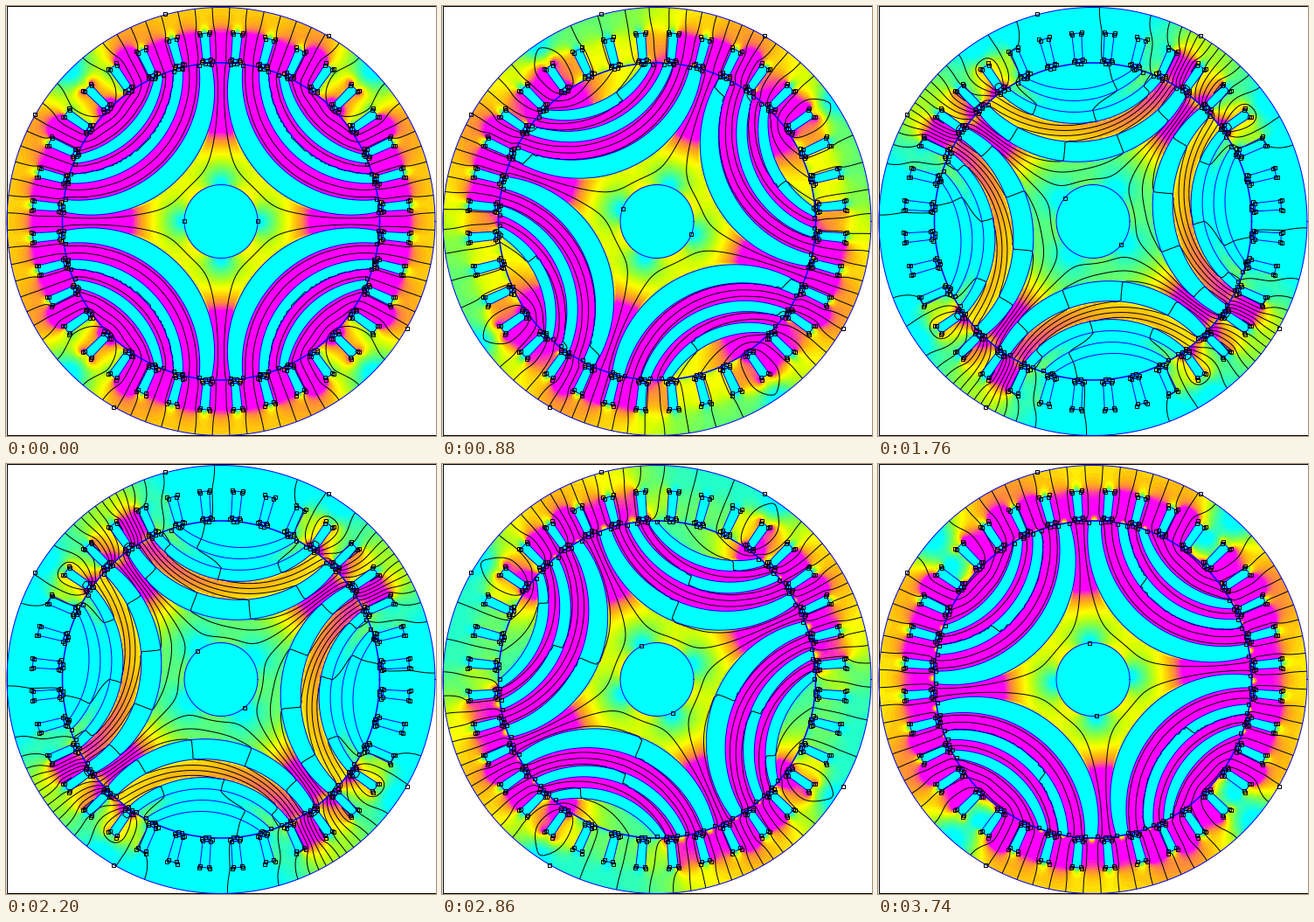
Recreate the animation shown at these times as a matplotlib script. Size 492 by 492 pixels, loop 3.96 s.

```python
import numpy as np
import matplotlib.pyplot as plt
from matplotlib.animation import FuncAnimation
from matplotlib.colors import LinearSegmentedColormap

SIZE, DPI = 492, 123
FRAMES, INTERVAL, STEP = 18, 220, 5
CX, CY = 245.5, 246
R_SHAFT, R_ROTOR, R_BORE, R_OUT = 42, 181, 182, 245
MMF = 2.1
PX = 72 / DPI
BLUE = "#0000ff"

# flux barrier edges: radius on the barrier axis, half angle at the rotor rim
EDGES = [(69, 41.5), (92, 37), (113, 31), (126, 27.5), (139, 23.5), (152, 20)]

DENSITY = LinearSegmentedColormap.from_list("density", [
    (0, "#00ffff"), (0.13, "#00ffff"), (0.28, "#46ff96"), (0.41, "#91ff37"),
    (0.51, "#d7ff00"), (0.58, "#ffff00"), (0.72, "#ffb90f"),
    (0.84, "#ff8246"), (1, "#ff00ff")], N=40)


def arc_circle(rq, half):
    """Centre distance and radius of the circle that forms a barrier edge."""
    c = (R_ROTOR**2 - rq**2) / (2 * (R_ROTOR * np.cos(np.radians(half)) - rq))
    return c, c - rq


ARCS = [arc_circle(*e) for e in EDGES]


def polar(r, deg):
    return r * np.exp(1j * np.radians(deg))


def in_barrier(r, deg):
    z = polar(r, deg % 90 - 45)
    past = [abs(z - c) < rho for c, rho in ARCS]
    return ((past[0] & ~past[1]) | (past[2] & ~past[3]) | (past[4] & ~past[5]))


def in_slot(r, deg):
    z = polar(r, deg % 10 - 5)
    u, v = z.real, abs(z.imag)
    body = (u > 186) & (u < 216) & (v < 4.6 + 0.03 * (u - 186))
    mouth = (u <= 186) & (v < 2)
    return body | mouth


def is_iron(r, deg, turn):
    rotor = (r > R_SHAFT) & (r < R_ROTOR) & ~in_barrier(r, deg + turn)
    stator = (r > R_BORE) & ~in_slot(r, deg)
    return rotor | stator


# ---- magnetic field on a polar grid covering one pole (90 degrees) ----
N = 108
DEG = 90 / N
DTH = np.radians(DEG)
ROTOR_ROWS = 52
r = np.concatenate([np.linspace(R_SHAFT, R_ROTOR, ROTOR_ROWS + 1),
                    [R_BORE, 184], np.linspace(186, 216, 11),
                    np.linspace(216, R_OUT, 9)[1:]])
M = len(r) - 1
dr = np.diff(r)
rc = (r[1:] + r[:-1]) / 2
idx = np.arange(N)
nxt = (idx + 1) % N


def iron_share(turn, sub=4):
    s = (np.arange(sub) + 0.5) / sub
    rs = (r[:-1, None] + dr[:, None] * s).ravel()
    ds = ((idx[:, None] + s) * DEG).ravel()
    iron = is_iron(rs[:, None], ds[None, :], turn)
    return iron.reshape(M, sub, N, sub).mean(axis=(1, 3))


def coil_source(share):
    """Current of the three wound slots around 45 degrees."""
    w = (1 - share) * (rc * dr)[:, None]
    w[(rc < 186) | (rc > 216)] = 0
    w[:, :36] = w[:, 72:] = 0
    w *= 2 * MMF / w.sum()
    src = np.zeros((M + 1, N))
    for di in (0, 1):
        for dj in (0, 1):
            src[di:di + M] += np.roll(w, dj, axis=1) / 4
    return src


def solve(nu, src):
    """Vector potential, block elimination row by row, sign flip at 90 deg."""
    rad = (nu + np.roll(nu, 1, axis=1)) / 2 * (rc * DTH / dr)[:, None]
    half = nu * dr[:, None] / 2
    tan = np.zeros((M + 1, N))
    tan[:-1] += half
    tan[1:] += half
    tan /= r[:, None] * DTH
    diag = tan + np.roll(tan, 1, axis=1)
    diag[:-1] += rad
    diag[1:] += rad
    invs, rhs = [None], [None]
    for i in range(1, M + 1):
        s = np.zeros((N, N))
        off = -tan[i]
        off[-1] *= -1
        s[idx, idx] = diag[i]
        s[idx, nxt] = off
        s[nxt, idx] = off
        y = src[i]
        if i > 1:
            g = rad[i - 1]
            s -= g[:, None] * invs[-1] * g
            y = y + g * (invs[-1] @ rhs[-1])
        invs.append(np.linalg.inv(s))
        rhs.append(y)
    a = np.zeros((M + 1, N))
    a[M] = invs[M] @ rhs[M]
    for i in range(M - 1, 0, -1):
        a[i] = invs[i] @ (rhs[i] + rad[i] * a[i + 1])
    return np.hstack([a, -a[:, :1]])


def flux_density(a):
    br = np.diff(a, axis=1) / (r[:, None] * DTH)
    bt = np.diff(a, axis=0) / dr[:, None]
    return np.hypot((br[1:] + br[:-1]) / 2, (bt[:, 1:] + bt[:, :-1]) / 2)


def blur(a):
    a = np.roll(a, 1, axis=1) + a + np.roll(a, -1, axis=1)
    p = np.pad(a, ((1, 1), (0, 0)), mode="edge")
    return p[:-2] + p[1:-1] + p[2:]


def spread(b, share):
    """Carry the iron values one cell into the air next to them."""
    w = (share > 0.45).astype(float)
    return np.where(w > 0, b, blur(b * w) / np.maximum(blur(w), 1e-9))


def compute_fields():
    fields = [None] * FRAMES
    src = coil_source(iron_share(0))
    nu_iron = np.full((M, N), 0.001)
    for k in range(FRAMES // 2, -1, -1):
        share = iron_share(STEP * k)
        for _ in range(14 if k == FRAMES // 2 else 9):
            a = solve(1 / (share / nu_iron + 1 - share), src)
            b = flux_density(a) / np.maximum(share, 0.4)
            goal = np.minimum(0.0004 + 0.006 * (b / 1.62)**8, 1)
            nu_iron = nu_iron**0.85 * goal**0.15
        shown = spread(b, share)
        fields[k] = a, shown
        if k:
            fields[FRAMES - k] = a[:, ::-1], shown[:, ::-1]
        shift = round(STEP / DEG)
        nu_iron[:ROTOR_ROWS] = np.roll(nu_iron[:ROTOR_ROWS], shift, axis=1)
    return fields


FIELDS = compute_fields()

# ---- picture ----
px, py = np.meshgrid(np.arange(SIZE), np.arange(SIZE))
pix = (px - CX) + 1j * (CY - py)
pix_r, pix_deg = abs(pix), np.degrees(np.angle(pix))
row = np.interp(pix_r, rc, np.arange(M))
i0 = np.minimum(row.astype(int), M - 2)
fi = row - i0
col = (pix_deg % 90) / DEG - 0.5
j0 = np.floor(col).astype(int)
fj = col - j0
j0, j1 = j0 % N, (j0 + 1) % N


def density_image(b, turn):
    v = ((1 - fi) * ((1 - fj) * b[i0, j0] + fj * b[i0, j1])
         + fi * ((1 - fj) * b[i0 + 1, j0] + fj * b[i0 + 1, j1]))
    v = np.where(is_iron(pix_r, pix_deg, turn), v, 0)
    img = DENSITY(np.clip(v, 0, 1))[..., :3]
    img[pix_r > R_OUT] = 1
    return img


def joined(paths):
    """One complex array with gaps between the paths."""
    return np.concatenate([np.append(p, np.nan) for p in paths])


def barrier_paths():
    paths, ends = [], []
    for q in range(4):
        axis = polar(1, 45 + 90 * q)
        for (c, rho), (_, half) in zip(ARCS, EDGES):
            tip = polar(R_ROTOR - 1, half)
            start = np.angle(tip - c)
            psi = np.linspace(start, 2 * np.pi - start, 60)
            paths.append(axis * (c + rho * np.exp(1j * psi)))
            ends += [axis * tip, axis * np.conj(tip)]
    return joined(paths), np.array(ends)


def slot_paths():
    body = np.array([186 - 4.6j, 216 - 5.5j, 216 + 5.5j, 186 + 4.6j, 186 - 4.6j])
    mouth = np.array([182 - 2j, 186 - 2j, 186 + 2j, 182 + 2j])
    corner = np.array([217 + 6j, 215 + 5j, 186 + 4.5j, 184 + 6j, 181.5 + 2j])
    corner = np.concatenate([corner, corner.conj()])
    turns = [polar(1, 5 + 10 * n) for n in range(36)]
    return (joined([t * p for t in turns for p in (body, mouth)]),
            np.concatenate([t * corner for t in turns]))


fig = plt.figure(figsize=(SIZE / DPI, SIZE / DPI), dpi=DPI)
ax = fig.add_axes([0, 0, 1, 1])
ax.axis("off")


def to_xy(z):
    return CX + z.real, CY - z.imag


def add_line(z, width=1):
    return ax.plot(*to_xy(z), color=BLUE, lw=width * PX, zorder=3)[0]


def add_boxes(z):
    return ax.plot(*to_xy(z), ls="none", marker="s", ms=4 * PX, mew=PX,
                   mfc="none", mec="black", zorder=4)[0]


image = ax.imshow(np.ones((SIZE, SIZE, 3)), interpolation="nearest",
                  aspect="auto")
barriers, barrier_ends = barrier_paths()
slots, slot_corners = slot_paths()
rotor_boxes = np.concatenate([barrier_ends, [R_SHAFT, -R_SHAFT]])

ring = polar(1, np.linspace(0, 360, 361))
add_line(R_OUT * ring)
add_line((R_ROTOR + 0.5) * ring, 1.6)
add_line(R_SHAFT * ring)
add_line(slots)
add_boxes(slot_corners)
add_boxes(polar(R_OUT + 0.5, np.array([60, 105, 150, -30, -120])))
barrier_line = add_line(barriers)
rotor_marks = add_boxes(rotor_boxes)
edge = SIZE - 1
ax.plot([0, edge, edge, 0, 0], [0, 0, edge, edge, 0], color="black", lw=PX,
        zorder=2)
ax.set_xlim(-0.5, SIZE - 0.5)
ax.set_ylim(SIZE - 0.5, -0.5)

mesh_x, mesh_y = to_xy(polar(r[:, None], np.arange(4 * N + 1)[None, :] * DEG))
flux_lines = []


def draw(k):
    a, b = FIELDS[k]
    image.set_data(density_image(b, STEP * k))
    while flux_lines:
        flux_lines.pop().remove()
    pole = a[:, :-1]
    full = np.hstack([pole, -pole, pole, -pole, pole[:, :1]])
    top = abs(full).max()
    flux_lines.append(ax.contour(
        mesh_x, mesh_y, full, levels=np.linspace(-top, top, 20)[1:-1],
        colors="black", linewidths=PX, linestyles="solid",
        antialiased=True, zorder=2))
    spin = polar(1, -STEP * k)
    barrier_line.set_data(*to_xy(barriers * spin))
    rotor_marks.set_data(*to_xy(rotor_boxes * spin))
    return [image, barrier_line, rotor_marks]


anim = FuncAnimation(fig, draw, frames=FRAMES, interval=INTERVAL, repeat=True,
                     repeat_delay=0, blit=False)
plt.show()
```
